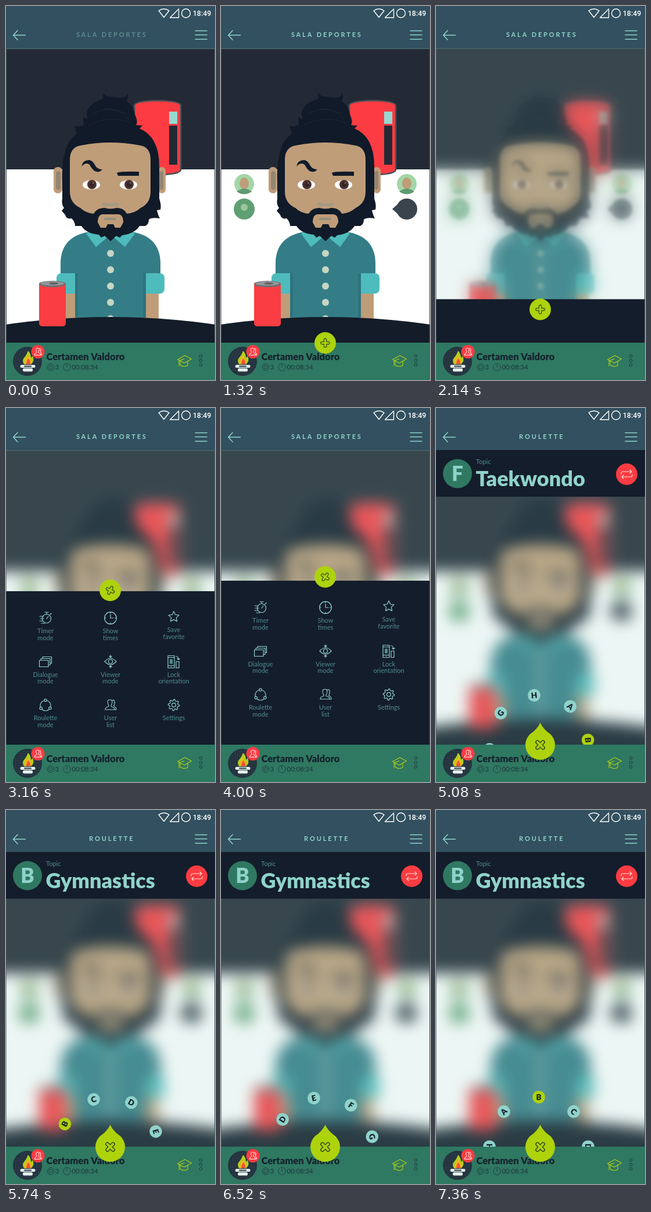
Write an HTML page with a canvas that moves like this. It is 360 px wide and 641 px high and loops after 7.92 s.

```html
<!DOCTYPE html>
<html lang="es">
<head>
<meta charset="utf-8">
<title>Roulette</title>
<style>
html, body { margin: 0; width: 100%; height: 100%; overflow: hidden; background: #141d2b; }
canvas { display: block; width: 360px; height: 641px; }
</style>
</head>
<body>
<canvas id="stage" width="360" height="641"></canvas>
<script>
const LOOP = 7920, TOP = 73, FOOT = 577, PAD = 45;
const NAVY = '#141d2b', MINT = '#8fd3ca', TEAL = '#4f8d90', LIME = '#aed20c',
      RED = '#fc3c42', HEAD = '#32505f', GREEN = '#2f7862', SKIN = '#bf9d79', HAIR = '#111a28';
const LATO = 'Lato, "Open Sans", sans-serif';
const stage = document.getElementById('stage').getContext('2d');
let c = stage;

// Smooth curve through keys [time, value, slope]
function track(t, keys) {
  if (t <= keys[0][0]) return keys[0][1];
  for (let i = 1; i < keys.length; i++) {
    const [t1, v1, m1 = 0] = keys[i], [t0, v0, m0 = 0] = keys[i - 1];
    if (t < t1) {
      const d = t1 - t0, u = (t - t0) / d, q = u * u * (3 - 2 * u);
      return v0 + (v1 - v0) * q + d * u * (1 - u) * (m0 * (1 - u) - m1 * u);
    }
  }
  return keys[keys.length - 1][1];
}
const ramp = (t, a, b) => track(t, [[a, 0], [b, 1]]);

function fill(d, color) { c.fillStyle = color; c.fill(new Path2D(d)); }
function line(d, color, w = 1.2) {
  c.strokeStyle = color; c.lineWidth = w; c.lineCap = c.lineJoin = 'round';
  c.stroke(new Path2D(d));
}
function oval(x, y, rx, ry, color) {
  c.beginPath(); c.ellipse(x, y, rx, ry, 0, 0, 7); c.fillStyle = color; c.fill();
}
const disc = (x, y, r, color) => oval(x, y, r, r, color);
function ring(x, y, r, color, w = 1.2) {
  c.beginPath(); c.arc(x, y, r, 0, 7); c.strokeStyle = color; c.lineWidth = w; c.stroke();
}
function rect(x, y, w, h, color, r = 0) {
  c.beginPath(); c.roundRect(x, y, w, h, r); c.fillStyle = color; c.fill();
}
function text(s, x, y, size, weight, color, align = 'left', gap = 0, family = LATO) {
  c.font = `${weight} ${size}px ${family}`;
  c.letterSpacing = gap + 'px';
  c.textAlign = align; c.fillStyle = color;
  c.fillText(s, x, y);
}
function at(x, y, draw, angle = 0, scale = 1) {
  c.save(); c.translate(x, y); c.rotate(angle); c.scale(scale, scale); draw(); c.restore();
}
function clipped(y0, y1, draw) {
  c.save(); c.beginPath(); c.rect(0, y0, 360, y1 - y0); c.clip(); draw(); c.restore();
}
function layer(draw) {
  const cv = document.createElement('canvas');
  cv.width = 360 + 2 * PAD; cv.height = 641 + 2 * PAD;
  c = cv.getContext('2d');
  c.translate(PAD, PAD);
  draw();
  c = stage;
  return cv;
}
const paste = cv => c.drawImage(cv, -PAD, -PAD);

function backCan() {
  const d = 'M221 170Q223 163 261 162Q299 163 301 170V281Q298 289 262 289Q224 288 221 281Z';
  fill(d, RED);
  line(d, '#4b5056', 2.6);
  rect(281, 181, 14, 21, '#97d8d0');
  rect(281, 205, 14, 67, '#232a35');
}

function body() {
  rect(103, 490, 20, 60, SKIN);
  rect(237, 490, 26, 60, SKIN);
  fill('M94 460V440Q95 392 150 386H210Q265 392 266 440V465H238V545H123V465H94Z', '#347d87');
  rect(87, 458, 37, 35, '#4ebcbc', [8, 0, 0, 8]);
  rect(236, 458, 37, 35, '#4ebcbc', [0, 8, 8, 0]);
  rect(119, 458, 5, 76, '#2f727d');
  rect(236, 458, 5, 76, '#2f727d');
  fill('M138 390L155 413L180 392L205 413L222 390L200 378H160Z', '#4ebcbc');
  for (let y = 424; y < 540; y += 28) disc(180, y, 6, '#c6d6c3');
}

function head() {
  rect(82, 276, 15, 45, SKIN, 7);
  rect(262, 276, 13, 45, SKIN, 7);
  rect(86, 283, 8, 32, '#948573', 4);
  rect(264, 283, 7, 32, '#948573', 4);
  fill('M97 300C96 262 102 232 122 219L118 205Q122 208 134 204L133 190L141 194Q136 184 143 174Q148 166 158 163L168 158' +
    'Q166 153 168 149Q172 156 181 155Q190 158 200 157Q207 156 209 150Q212 158 207 163Q220 170 222 186Q228 198 224 204' +
    'L235 205L230 210Q264 224 264 275L264 330Q268 342 266 349L260 350Q262 359 265 364Q250 362 246 366Q246 374 240 377' +
    'L230 377Q222 390 200 393L196 397L190 394L180 403L170 394L164 397L160 392Q138 390 130 377L119 377Q119 370 113 364' +
    'Q104 366 102 358L96 351L100 346Q95 340 97 330Z', HAIR);
  line('M150 185Q175 170 205 184M142 205Q175 186 215 200M170 176Q200 176 211 194', '#1d2836', 1);
  fill('M110 266Q109 242 129 239Q180 229 231 239Q250 242 249 266V318Q249 338 232 346Q222 355 208 356H150Q136 354 128 346Q110 338 110 318Z', SKIN);
  fill('M147 375Q147 346 170 346Q180 349 190 346Q212 346 212 375Z', HAIR);
  fill('M158 371Q158 357 167 357H193Q202 357 202 371L197 380H188L185 374H175L172 380H163Z', SKIN);
  rect(169, 363, 21, 4, '#92907f', 2);
  fill('M166 341Q166 336 172 337Q180 340 188 337Q194 336 194 341Q191 345 186 343H174Q169 345 166 341Z', '#a49a82');
  for (const x of [148, 212]) {
    oval(x - 1, 306.5, 15, 8, '#fff');
    disc(x, 306, 8, '#4d3431');
    disc(x, 306, 4.5, '#35252a');
    disc(x + 2, 303.5, 1.2, '#8b6a60');
  }
  fill('M130 275Q132 264 143 264Q149 264 154 274Q158 280 166 280Q160 287 152 282.500Q147 278 144 272Q138 267 130 275Z', HAIR);
  fill('M191 286Q196 283 229 284V291H193Z', HAIR);
}

function scene() {
  rect(-PAD, -PAD, 450, 280 + PAD, '#232a35');
  rect(-PAD, 280, 450, 420, '#fff');
  backCan();
  body();
  head();
  fill('M-45 553Q180 513 405 553V690H-45Z', '#131c28');
  rect(57, 474, 46, 75, '#f93d43', [2, 2, 5, 5]);
  oval(80, 476.5, 23, 5.5, '#6e6f73');
  oval(80, 475.5, 20, 3.6, '#94979a');
  oval(82, 475.5, 8, 1.8, '#5d5f64');
}

function sides() {
  for (const x of [40, 320]) {
    disc(x, 305, 17, '#a3d6a6');
    oval(x, 304, 8, 10, SKIN);
    fill(`M${x - 13} 318Q${x} 308 ${x + 13} 318Q${x} 327 ${x - 13} 318Z`, '#5f9a72');
  }
  disc(40, 348, 18, '#5f9f72');
  disc(40, 345, 6, '#9cc79c');
  disc(320, 348, 18, '#3b444d');
  fill('M304 340L295 348L304 356Z', '#3b444d');
}

const base = layer(scene), extras = layer(sides);
const full = layer(() => { paste(base); paste(extras); });
const soft = layer(() => { c.filter = 'blur(13px)'; paste(full); });

// The sharp room dissolves into its blurred copy
function content(t) {
  const veil = track(t, [[1780, 0], [2140, .72, .0015], [2560, 1]]);
  clipped(TOP - 1, FOOT, () => {
    if (!veil) {
      paste(base);
      c.globalAlpha = ramp(t, 0, 300);
      paste(extras);
    } else {
      if (veil < 1) {
        c.filter = `blur(${(4 * veil).toFixed(2)}px)`;
        paste(full);
        c.filter = 'none';
      }
      c.globalAlpha = veil;
      paste(soft);
    }
    c.globalAlpha = .18 * ramp(t, 1780, 2160);
    rect(0, TOP, 360, FOOT - TOP, '#98cec4');
  });
}

function people(color, w) {
  line('M3 -8Q8 -10 7 -2Q5 2 7 3Q10 4 10 8H7', color, w);
  line('M-9 8Q-9 4 -4 3Q-2 2 -4 -1Q-7 -9 -1 -9Q5 -9 2 -1Q0 2 2 3Q7 4 7 8Z', color, w);
}

const icons = [
  () => {
    ring(2, 1, 7.5, MINT);
    line('M2 -7V-10M-1 -10H5M8 -6L10 -8M2 1L5 -3M-10 -3H-4M-9 1H-3M-10 5H-4M-7 9H-1', MINT);
  },
  () => {
    ring(0, 0, 10.3, MINT);
    line('M0 -6V0H5M0 -10V-8M0 10V8M-10 0H-8M10 0H8', MINT);
  },
  () => {
    let d = '';
    for (let i = 0; i < 10; i++) {
      const r = i % 2 ? 4.6 : 9.5, a = i * Math.PI / 5;
      d += (i ? 'L' : 'M') + r * Math.sin(a) + ' ' + -r * Math.cos(a);
    }
    line(d + 'Z', MINT);
  },
  () => line('M-10.5 -2H5V9H-10.5ZM-8 -2V-5H8V6H5M-5 -5V-8H10.5V3H8', MINT),
  () => {
    line('M-10 0Q0 -11 10 0Q0 11 -10 0ZM0 -11V-7M-2 -9L0 -7L2 -9M0 11V7M-2 9L0 7L2 9', MINT);
    ring(0, 0, 3.5, MINT);
  },
  () => {
    line('M-10 -10H1V11H-10ZM-10 -7H1M-10 7H1M-5 9H-4M4 0H9V11H4ZM4 -9Q8 -9 8 -3M6 -5L8 -3L10 -5', MINT);
    rect(-7, -4, 5, 8, TEAL);
  },
  () => {
    for (let i = 0; i < 3; i++) {
      const a = -Math.PI / 2 + i * Math.PI * 2 / 3;
      c.beginPath(); c.arc(0, 1, 9, a + .32, a + 1.77);
      c.strokeStyle = MINT; c.lineWidth = 1.2; c.stroke();
      ring(9 * Math.cos(a), 1 + 9 * Math.sin(a), 2.2, MINT);
    }
  },
  () => people(MINT, 1.2),
  () => {
    let d = '';
    for (let i = 0; i < 32; i++) {
      const r = i % 4 < 2 ? 9.6 : 7.2, a = i * Math.PI / 16;
      d += (i ? 'L' : 'M') + r * Math.cos(a) + ' ' + r * Math.sin(a);
    }
    line(d + 'Z', MINT);
    ring(0, 0, 3.4, MINT);
  }
];
const labels = ['Timer mode', 'Show times', 'Save favorite', 'Dialogue mode', 'Viewer mode',
  'Lock orientation', 'Roulette mode', 'User list', 'Settings'];

function menu(t) {
  const y = track(t, [[1780, 577], [2140, 502.5, -.42], [2620, 336, -.11], [3160, 314, -.004],
    [3380, 313], [3840, 279], [4000, 296, .23], [4430, 577, 1]]);
  if (y >= FOOT) return;
  clipped(0, FOOT, () => {
    rect(0, y, 360, 400, NAVY);
    c.globalAlpha = ramp(t, 2160, 2640);
    labels.forEach((label, i) => {
      const col = i % 3, row = Math.floor(i / 3), x = [68, 180, 289][col];
      const top = y + row * 74.5 - (i === 2 ? 2 : 0);
      at(x, top + 46, icons[i]);
      label.split(' ').forEach((word, k) => text(word, x, top + 72 + k * 11.5, 11, 400, TEAL, 'center'));
    });
  });
}

function border() {
  c.strokeStyle = '#47595e'; c.lineWidth = 1;
  c.strokeRect(.5, TOP + .5, 359, FOOT - TOP + 1);
}

function topic(t) {
  const y = track(t, [[4480, -80], [4900, 0]]);
  if (y <= -80) return;
  const [letter, name] = t < 5400 ? ['F', 'Taekwondo'] : ['B', 'Gymnastics'];
  clipped(72, FOOT, () => at(0, y, () => {
    rect(0, 72, 360, 80, NAVY);
    disc(37, 112.5, 25, GREEN);
    text(letter, 37, 125, 35, 900, MINT, 'center');
    text('Topic', 69, 96, 11, 400, TEAL);
    text(name, 68.5, 134, 36, 900, MINT);
    disc(328.5, 113.5, 18.5, RED);
    line('M319 113V112Q319 109 322 109H337M334 106L337 109L334 112M338 114V115Q338 118 335 118H320M323 115L320 118L323 121', '#ffd9d2', 1.2);
  }));
}

function wheel(t) {
  const show = ramp(t, 4600, 4900);
  if (!show) return;
  const turn = track(t, [[4640, 0], [5080, 39.6, .2], [5740, 252.2, .365], [7360, 675]]);
  clipped(0, FOOT, () => {
    for (let i = 0; i < 8; i++) {
      at(177, FOOT, () => {
        const y = -25 - 60 * show;
        disc(0, y, 10.8, i === 1 ? LIME : MINT);
        text('ABCDEFGH'[i], 0, y + 4.8, 13.5, 900, NAVY, 'center');
      }, (turn + i * 45) * Math.PI / 180);
    }
  });
}

function header(t) {
  rect(0, 0, 360, 72, HEAD);
  rect(0, 72, 360, 1, '#3d666c');
  line('M263 8Q272 2 281 8L272 19.500ZM297.500 5V20H282.500Z', '#fff', 1.4);
  ring(310, 12.5, 7.5, '#fff', 1.4);
  text('18:49', 321.7, 17, 12.5, 500, '#fff', 'left', 0, 'Roboto, sans-serif');
  line('M12.500 50H33.500M20 42L12.500 50L20 58', MINT, 1.5);
  line('M326 42.500H346M326 49.500H346M326 57H346', MINT, 1.6);
  const swap = ramp(t, 4430, 4700);
  c.globalAlpha = (.45 + .55 * ramp(t, 0, 300)) * (1 - swap);
  text('SALA DEPORTES', 182.3, 53, 11, 700, MINT, 'center', 2.85);
  c.globalAlpha = swap;
  text('ROULETTE', 182.3, 53, 11, 700, MINT, 'center', 2.85);
  c.globalAlpha = 1;
}

function footer() {
  rect(0, FOOT, 360, 64, GREEN);
  disc(37, 609, 25, '#25333f');
  for (let y = 588; y < 634; y += 4)
    for (let x = 16; x < 60; x += 4)
      if (Math.hypot(x - 37, y - 609) < 23) rect(x, y, 1.3, 1.3, '#35505a');
  fill('M38 591Q35 599 31 603Q27 608 31 614H43Q50 609 46 600L43 603Q43 596 38 591Z', '#b6cf1c');
  fill('M38.500 599Q33 605 32 609Q32 614 38 614Q44 614 43.500 608Q41 605 38.500 599Z', '#f0b31f');
  fill('M38.500 604Q35 608 35 614H41.500Q43 609 38.500 604Z', '#f0543a');
  rect(24.5, 615, 26, 5, '#e4eeea', 2.5);
  rect(29, 621, 17, 5.5, '#e4eeea', 2);
  rect(31, 616.5, 13, 2, '#25333f', 1);
  disc(55, 592.5, 11.5, RED);
  at(55, 592.5, () => people('#fff', 1.4), 0, .68);
  text('Certamen Valdoro', 69.5, 607, 16.5, 900, '#14222c');
  const ink = '#1c353b';
  ring(77, 619, 5.8, ink, .8);
  line('M74.500 616.500H79.500V621H77L75 622.500V621H74.500Z', ink, .7);
  text('3', 84.5, 623, 11.3, 400, ink);
  ring(105, 619, 6.3, ink, .8);
  line('M105 615V619', ink, .9);
  text('00:08:34', 113.5, 623, 11.3, 400, ink);
  line('M295.500 606L308 599L319.500 605L307 612ZM300 609V615Q306 620 313 616V609M307 605L298 608V617', '#b5d111', 1.05);
  for (const y of [600, 607.5, 615]) ring(335.5, y, 2.4, ink, .9);
}

function plusButton(t) {
  const alpha = ramp(t, 650, 820);
  if (!alpha) return;
  const y = track(t, [[650, 582.5], [820, 577.5], [1780, 577.5], [2140, 520, -.4], [2640, 334, -.1],
    [3160, 312.5], [3400, 312], [3860, 275.5], [4000, 289.5, .24], [4470, 577.5, .9], [4500, 577.5]]);
  const grow = ramp(t, 4460, 4800), r = 18.5 + 7 * grow;
  const spin = track(t, [[2140, 0], [3160, 28], [3400, 30], [4000, 35], [4470, 45]]);
  c.globalAlpha = alpha;
  at(179.5, y, () => {
    disc(0, 0, r, LIME);
    if (grow) fill(`M${-r * .74} ${-r * .67}Q-5 -27 0 ${-18.5 - 19.5 * grow}Q5 -27 ${r * .74} ${-r * .67}Z`, LIME);
    at(0, 0, () => {
      const cross = 'M-5.500 0H5.500M0 -5.500V5.500';
      line(cross, '#33491c', 5.6);
      line(cross, LIME, 3.2);
    }, spin * Math.PI / 180, 1 + .25 * grow);
  });
  c.globalAlpha = 1;
}

function frame(now) {
  const t = now % LOOP;
  content(t);
  menu(t);
  border();
  wheel(t);
  header(t);
  topic(t);
  footer();
  plusButton(t);
}

let start;
function tick(now) {
  start ??= now;
  frame(now - start);
  requestAnimationFrame(tick);
}
requestAnimationFrame(tick);
</script>
</body>
</html>
```
